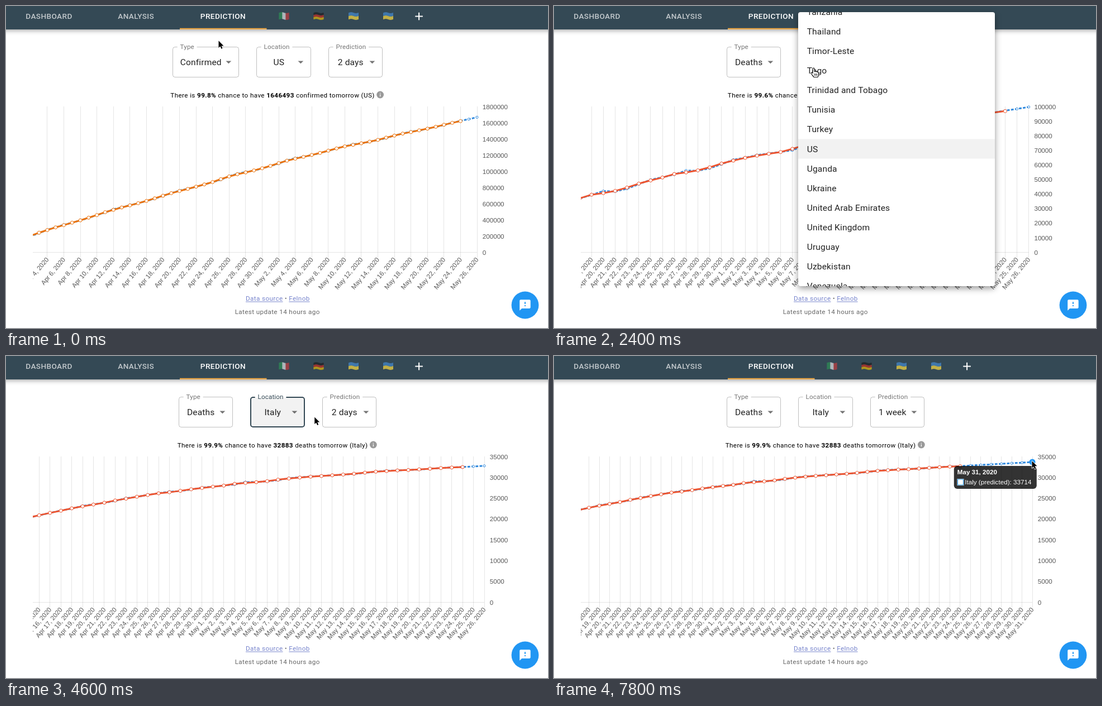
Recreate the animation shown at these times as an HTML page with a canvas. Size 970 by 577 pixels, loop 8000 ms.

```html
<!DOCTYPE html>
<html lang="en">
<head>
<meta charset="utf-8">
<title>Prediction dashboard</title>
<style>
html, body { margin: 0; width: 100%; height: 100%; overflow: hidden; background: #fff; }
canvas { display: block; width: 970px; height: 577px; }
</style>
</head>
<body>
<canvas id="stage"></canvas>
<script>
const W = 970, H = 577, LOOP = 8000, STEP = 200;
const canvas = document.getElementById('stage');
const ratio = window.devicePixelRatio || 1;
canvas.width = W * ratio;
canvas.height = H * ratio;
const ctx = canvas.getContext('2d');

const UI = 'Roboto, sans-serif', AXIS = '"Liberation Sans", Arial, sans-serif';
const NAVY = '#344955', INK = 'rgba(0,0,0,.87)', SOFT = 'rgba(0,0,0,.54)', BLUE = '#318ade';
const SMALL = 11.66, BODY = 15.55;
const LEFT = 48, TOP = 180.5, BOTTOM = 441.5, ROW = 35.1;

// Daily totals; the last entry of each list is May 24.
const confirmed = {
  unit: 1000, back: .85, next: 1646493, step: 23600, max: 1800000, tick: 200000, color: '#ec730c',
  list: [243, 276, 309, 337, 367, 396, 429, 461, 497, 526, 555, 581, 608, 636, 668, 700, 732, 759,
    784, 812, 840, 869, 905, 938, 966, 988, 1013, 1040, 1069, 1103, 1133, 1158, 1180, 1204, 1229,
    1257, 1284, 1310, 1329, 1348, 1369, 1390, 1418, 1443, 1468, 1487, 1508, 1529, 1552, 1577, 1601, 1622]
};
const deathsUS = {
  unit: 100, back: .935, next: 98494, step: 1350, max: 100000, tick: 10000, color: '#ee5530',
  list: [371, 396, 407, 422, 445, 472, 494, 514, 538, 549, 563, 584, 610, 630, 649, 664, 677, 689,
    711, 735, 757, 772, 788, 795, 807, 824, 841, 859, 875, 888, 896, 903, 919, 934, 947, 960, 970]
};
const deathsItaly = {
  unit: 10, back: .973, next: 32883, step: 138.5, max: 35000, tick: 5000, color: '#ee5530',
  list: [2107, 2165, 2217, 2275, 2323, 2366, 2411, 2465, 2509, 2555, 2597, 2638, 2664, 2698, 2736,
    2768, 2797, 2824, 2867, 2889, 2908, 2932, 2968, 2996, 3020, 3040, 3056, 3074, 3091, 3111, 3137,
    3161, 3176, 3191, 3201, 3217, 3233, 3249, 3262, 3273]
};

const views = [
  { start: -2000, data: confirmed, right: 843, gap: 14.79, ahead: 2, every: 2, text: ['99.8%', '1646493', 'confirmed', 'US'] },
  { start: 1316, data: deathsUS, right: 849.7, gap: 21.15, ahead: 2, every: 1, shift: 37, text: ['99.6%', '98494', 'deaths', 'US'] },
  { start: 3884, data: deathsItaly, right: 856, gap: 19.43, ahead: 2, every: 1, rise: true, text: ['99.9%', '32883', 'deaths', 'Italy'] },
  { start: 6230, data: deathsItaly, right: 856, gap: 18.45, ahead: 7, every: 1, shift: 0, text: ['99.9%', '32883', 'deaths', 'Italy'] }
];
views.forEach((v, i) => v.prev = views[i - 1]);

const lerp = (a, b, k) => a + (b - a) * k;
const clamp = v => Math.max(0, Math.min(1, v));

function text(str, x, y, o = {}) {
  const size = o.size || SMALL;
  ctx.font = `${o.weight || 400} ${size}px ${o.font || UI}`;
  ctx.letterSpacing = (o.space || 0) * size + 'px';
  ctx.fillStyle = o.color || INK;
  const w = ctx.measureText(str).width;
  const left = o.align === 'center' ? x - w / 2 : o.align === 'right' ? x - w : x;
  if (!o.dry) ctx.fillText(str, left, y + size * .355);
  return w;
}

function rounded(x, y, w, h, r) {
  ctx.beginPath();
  ctx.roundRect(x, y, w, h, r);
}

// Shadow only outside the box, so translucent boxes stay clean.
function shadowBox(x, y, w, h, r, blur, dy, color) {
  ctx.save();
  ctx.beginPath();
  ctx.rect(0, 0, W, H);
  ctx.roundRect(x, y, w, h, r);
  ctx.clip('evenodd');
  ctx.shadowColor = color;
  ctx.shadowBlur = blur * ratio;
  ctx.shadowOffsetY = dy * ratio;
  ctx.fillStyle = '#000';
  rounded(x, y, w, h, r);
  ctx.fill();
  ctx.restore();
}

function triangle(x, y, up) {
  const d = up ? -2.4 : 2.4;
  ctx.fillStyle = SOFT;
  ctx.beginPath();
  ctx.moveTo(x - 4.9, y - d);
  ctx.lineTo(x + 4.9, y - d);
  ctx.lineTo(x, y + d);
  ctx.fill();
}

// ---- header ----
function flag(cx, colors, vertical) {
  ctx.globalAlpha = .8;
  for (let i = 0; i < 18; i++) {
    const y = 12 - Math.sin(i / 17 * Math.PI * 2) * .9;
    colors.forEach((c, k) => {
      if (vertical && Math.floor(i / 6) !== k) return;
      const h = vertical ? 12 : 12 / colors.length;
      ctx.fillStyle = c;
      ctx.fillRect(cx - 9 + i, y + (vertical ? 0 : k * h), 1, h);
    });
  }
  ctx.globalAlpha = 1;
}

function header() {
  shadowBox(-20, -20, W + 40, 62, 0, 8, 2, 'rgba(0,0,0,.36)');
  ctx.fillStyle = NAVY;
  ctx.fillRect(0, 0, W, 42);
  [['DASHBOARD', 77], ['ANALYSIS', 232.7], ['PREDICTION', 388.5]].forEach(([s, x], i) =>
    text(s, x, 18.6, { size: 13.6, weight: 500, space: .02857, align: 'center', color: i === 2 ? '#fff' : 'rgba(255,255,255,.7)' }));
  ctx.fillStyle = '#eda847';
  ctx.fillRect(311, 39.7, 155.5, 2.3);
  flag(497.5, ['#2f9a55', '#f2f2f2', '#d33c3c'], true);
  flag(559.5, ['#1c1c1c', '#d52b1e', '#f5c400']);
  flag(622, ['#4384c2', '#e6cb44']);
  flag(684, ['#4384c2', '#e6cb44']);
  ctx.fillStyle = '#fff';
  ctx.fillRect(732.3, 17.5, 13.6, 2);
  ctx.fillRect(738.1, 11.7, 2, 13.6);
}

// ---- selects ----
function select(x, w, label, value, o) {
  const y = 73, h = 55;
  ctx.lineWidth = o.focus ? 2 : 1;
  ctx.strokeStyle = o.focus ? NAVY : o.hover ? INK : 'rgba(0,0,0,.25)';
  const inset = o.focus ? 1 : .5;
  rounded(x + inset, y + inset, w - 2 * inset, h - 2 * inset, 4);
  ctx.stroke();
  const style = { space: .00938, color: o.focus ? NAVY : SOFT };
  const lw = text(label, 0, 0, { ...style, dry: true });
  ctx.fillStyle = '#fff';
  ctx.fillRect(x + 8.7, y - 1, lw + 9.7, 4);
  if (o.focus) {
    ctx.fillStyle = 'rgba(0,0,0,.05)';
    rounded(x + 2, y + 2, w - 4, h - 4, 3);
    ctx.fill();
  }
  text(label, x + 13.6, 73.2, style);
  text(value, x + 13.6 + (w - 44.7) / 2, 100.8, { size: BODY, space: .00938, align: 'center' });
  triangle(x + w - 18.6, 100.8, o.open);
}

function selects(t) {
  const first = t < 1316;
  const on = (a, b) => t >= a && t < b;
  select(first ? 298 : 309, first ? 119 : 97, 'Type', first ? 'Confirmed' : 'Deaths',
    { focus: on(460, 2150), hover: on(200, 460), open: on(460, 1316) });
  select(first ? 448 : 437, 98, 'Location', t < 3884 ? 'US' : 'Italy',
    { focus: on(2150, 5287), hover: on(1700, 2150), open: on(2150, 3884) });
  select(first ? 577 : 566, 97, 'Prediction', t < 6230 ? '2 days' : '1 week',
    { focus: on(5287, 7200), hover: on(5000, 5287), open: on(5287, 6230) });
}

function summary([chance, count, kind, place]) {
  const parts = [['There is ', 400], [chance, 700], [' chance to have ', 400], [count, 700], [` ${kind} tomorrow (${place})`, 400]];
  const opt = weight => ({ weight, space: .0333, color: '#000' });
  const width = parts.reduce((sum, [s, wt]) => sum + text(s, 0, 0, { ...opt(wt), dry: true }), 0);
  let x = 485.5 - (width + 17) / 2;
  for (const [s, wt] of parts) x += text(s, x, 159.8, opt(wt));
  ctx.fillStyle = '#9a9a9a';
  ctx.beginPath();
  ctx.arc(x + 10, 159, 6.4, 0, 7);
  ctx.fill();
  ctx.fillStyle = '#fff';
  ctx.fillRect(x + 9.4, 158.3, 1.3, 4);
  ctx.fillRect(x + 9.4, 155.7, 1.3, 1.4);
}

// ---- chart ----
function actual(s, d) {
  const i = s.list.length - 1 + d;
  return s.unit * (i >= 0 ? s.list[i] : s.list[0] * s.back ** -i);
}
const predicted = (s, d) => d > 0 ? s.next + s.step * (d - 1) : 2 * actual(s, d - 1) - actual(s, d - 2);
const xOf = (v, d) => v.right - (v.ahead - d) * v.gap;
const yOf = (v, n) => BOTTOM - n / v.data.max * (BOTTOM - TOP);

function dateLabel(d) {
  const day = new Date(Date.UTC(2020, 4, 24 + d));
  return `${['Mar', 'Apr', 'May'][day.getUTCMonth() - 2]} ${day.getUTCDate()}, 2020`;
}

function place(v, d, fn, rest) {
  const x = xOf(v, d), y = yOf(v, fn(v.data, d));
  if (v.rise) return [x, lerp(y, BOTTOM, rest)];
  const old = d - v.shift;
  if (!v.prev || old > v.prev.ahead) return [x, y];
  return [lerp(x, xOf(v.prev, old), rest), lerp(y, yOf(v.prev, fn(v.prev.data, old)), rest)];
}

function series(v, fn, last, rest, color, radius, dash) {
  const pts = [];
  for (let d = -70; d <= last; d++) pts.push(place(v, d, fn, rest));
  ctx.strokeStyle = color;
  ctx.lineWidth = 3;
  ctx.lineJoin = 'round';
  ctx.setLineDash(dash);
  ctx.beginPath();
  pts.forEach(p => ctx.lineTo(...p));
  ctx.stroke();
  ctx.setLineDash([]);
  ctx.lineWidth = 1;
  ctx.fillStyle = '#fff';
  for (const [x, y] of pts) {
    ctx.beginPath();
    ctx.arc(x, y, radius, 0, 7);
    ctx.fill();
    ctx.stroke();
  }
}

function chart(v, t) {
  const rest = (1 - clamp((t - v.start) / 1000)) ** 4;
  const axis = { font: AXIS, color: '#575757' };
  for (let n = 0; n <= v.data.max; n += v.data.tick) text(String(n), v.right + 9.7, yOf(v, n), axis);

  ctx.save();
  ctx.beginPath();
  ctx.rect(LEFT, 0, W, H);
  ctx.clip();
  ctx.fillStyle = 'rgba(0,0,0,.1)';
  ctx.fillRect(LEFT, 441, v.right - LEFT, 1);
  for (let d = v.ahead; xOf(v, d) > 20; d -= v.every) {
    const x = xOf(v, d);
    ctx.fillStyle = 'rgba(0,0,0,.1)';
    ctx.fillRect(Math.floor(x), 180, 1, 271);
    ctx.save();
    ctx.translate(x, 452);
    ctx.rotate(-50 * Math.PI / 180);
    text(dateLabel(d), 0, 0, { ...axis, align: 'right' });
    ctx.restore();
  }
  series(v, predicted, v.ahead, rest, BLUE, 2, [4.8, 2.4]);
  series(v, actual, 0, rest, v.data.color, 2.95, []);
  ctx.restore();
}

function tooltip() {
  ctx.fillStyle = '#2196f3';
  ctx.beginPath();
  ctx.arc(856, 190, 5.5, 0, 7);
  ctx.fill();
  ctx.fillStyle = 'rgba(0,0,0,.8)';
  rounded(715.8, 197, 148, 41, 5.8);
  ctx.fill();
  text('May 31, 2020', 721.7, 208.2, { font: AXIS, weight: 700, color: '#fff' });
  ctx.fillStyle = '#fff';
  ctx.fillRect(721.5, 220, 12, 12);
  ctx.strokeStyle = '#2196f3';
  ctx.lineWidth = 1;
  ctx.strokeRect(722.5, 221, 10, 10);
  text('Italy (predicted): 33714', 735.2, 226, { font: AXIS, color: '#fff' });
}

// ---- footer ----
function link(str, x) {
  const color = '#7683cc';
  const w = text(str, x, 524.2, { space: .0333, color });
  ctx.fillStyle = color;
  ctx.fillRect(x, 529.5, w, 1);
}

const bubble = new Path2D('M20 2H4c-1.1 0-2 .9-2 2v18l4-4h14c1.1 0 2-.9 2-2V4c0-1.1-.9-2-2-2zm-7 12h-2v-2h2zm0-4h-2V6h2z');

function footer() {
  link('Data source', 429);
  text('•', 500.8, 524.2, { align: 'center', color: SOFT });
  link('Felnob', 506.3);
  text('Latest update 14 hours ago', 485.7, 547.8, { space: .0333, align: 'center', color: 'rgba(0,0,0,.6)' });
  ctx.fillStyle = '#2196f3';
  ctx.beginPath();
  ctx.arc(929, 536, 24.4, 0, 7);
  ctx.fill();
  ctx.save();
  ctx.translate(917.3, 524.4);
  ctx.scale(.972, .972);
  ctx.fillStyle = '#fff';
  ctx.fill(bubble, 'evenodd');
  ctx.restore();
}

// ---- menus ----
const lateNames = ['Tanzania', 'Thailand', 'Timor-Leste', 'Togo', 'Trinidad and Tobago', 'Tunisia', 'Turkey', 'US', 'Uganda',
  'Ukraine', 'United Arab Emirates', 'United Kingdom', 'Uruguay', 'Uzbekistan', 'Venezuela'];
const midNames = ['Guinea', 'Guinea-Bissau', 'Guyana', 'Haiti', 'Holy See', 'Honduras', 'Hungary', 'Iceland', 'India',
  'Indonesia', 'Iran', 'Iraq', 'Ireland', 'Israel', 'Italy'];

function menu(t, m) {
  const p = clamp((t - m.open) / 240), q = clamp((t - m.close) / 250);
  if (p === 0 || q === 1) return;
  const scale = .75 + .25 * (1 - (1 - p) ** 3);
  ctx.save();
  ctx.translate(m.ox, 101);
  ctx.scale(scale, scale * scale);
  ctx.translate(-m.ox, -101);
  ctx.globalAlpha = p * (1 - q);
  shadowBox(m.x, m.y, m.w, m.h, 4, 12, 4, 'rgba(0,0,0,.42)');
  ctx.fillStyle = '#fff';
  rounded(m.x, m.y, m.w, m.h, 4);
  ctx.fill();
  ctx.clip();
  m.items.forEach((name, i) => {
    const y = m.first + i * ROW;
    if (m.lit.includes(i)) {
      ctx.fillStyle = 'rgba(0,0,0,.05)';
      ctx.fillRect(m.x, y - ROW / 2, m.w, ROW);
    }
    text(name, m.x + 15.7, y, { size: BODY, space: .00938 });
  });
  if (m.thumb) {
    ctx.fillStyle = '#7d7d7d';
    rounded(780, 263, 7, 21.5, 3.5);
    ctx.fill();
  }
  ctx.restore();
}

function menus(t) {
  menu(t, { open: 460, close: 1316, x: 296, y: 75.6, w: 125, h: 121, ox: 358, first: 101,
    items: ['Confirmed', 'Recovered', 'Deaths'], lit: t < 800 ? [0] : t < 1000 ? [0, 1] : [0, 2] });
  const typed = t >= 3000, found = t >= 3600;
  menu(t, { open: 2150, close: 3884, x: 437, y: 11, w: 352, h: 491, ox: 486, first: found ? -7.1 : 10.3,
    items: typed ? midNames : lateNames, lit: found ? [3, 14] : [7], thumb: typed && t < 3800 });
  menu(t, { open: 5287, close: 6230, x: 564, y: 40.6, w: 103, h: 156, ox: 615.5, first: 65.7,
    items: ['Tomorrow', '2 days', '3 days', '1 week'], lit: t < 5600 ? [1] : t < 5800 ? [1, 2] : [1, 3] });
}

// ---- pointer ----
const arrow = new Path2D('M0 0v12.6l2.9-2.7 2 4.5 2.1-.9-2-4.4h4z');
const hand = new Path2D('M4 1.5c0-2 3-2 3 0v5c.3-1 2.5-1 2.7.3.5-.7 2.3-.5 2.5.7.8-.5 2.3 0 2.3 1.5v3c0 2.5-1 3-1.5 4.5h-7c-1-2-3-3.5-5-6.5-.8-1.3 1-2.5 2.2-1.3l.8.8z');
const fingers = new Path2D('M7.3 10v4M9.4 10v4M11.5 10v4');
const route = [[0, 380.5, 62.3], [400, 372, 98], [700, 372, 104], [1100, 352, 166], [1300, 352, 166],
  [1800, 457.5, 114.5], [2200, 464.5, 111], [4200, 464.5, 111], [5000, 640, 108], [5400, 647.8, 111],
  [6000, 625, 170], [6300, 625, 170], [6800, 676.3, 181], [7600, 855, 188], [8000, 856, 188.5]];

function pointer(t) {
  const i = Math.max(1, route.findIndex(k => k[0] >= t));
  const [a, b] = [route[i - 1], route[i]];
  const k = clamp((t - a[0]) / (b[0] - a[0])), e = k * k * (3 - 2 * k);
  const isHand = (t >= 200 && t < 4400) || (t >= 5600 && t < 6400);
  ctx.save();
  ctx.translate(lerp(a[1], b[1], e), lerp(a[2], b[2], e));
  ctx.lineJoin = 'round';
  if (isHand) {
    ctx.translate(-5.5, 0);
    ctx.fillStyle = '#fff';
    ctx.strokeStyle = '#111';
    ctx.lineWidth = 1.2;
    ctx.fill(hand);
    ctx.stroke(hand);
    ctx.lineWidth = .9;
    ctx.stroke(fingers);
  } else {
    ctx.strokeStyle = '#fff';
    ctx.lineWidth = 1.6;
    ctx.stroke(arrow);
    ctx.fillStyle = '#000';
    ctx.fill(arrow);
  }
  ctx.restore();
}

function draw(t) {
  const view = views.filter(v => v.start <= t).pop();
  ctx.setTransform(ratio, 0, 0, ratio, 0, 0);
  ctx.fillStyle = '#fff';
  ctx.fillRect(0, 0, W, H);
  header();
  selects(t);
  summary(view.text);
  chart(view, t);
  footer();
  if (t >= 7600) tooltip();
  menus(t);
  pointer(t);
}

const begin = performance.now();
function tick() {
  const t = (performance.now() - begin) % LOOP;
  draw(Math.floor(t / STEP) * STEP);
  requestAnimationFrame(tick);
}
tick();
</script>
</body>
</html>
```
